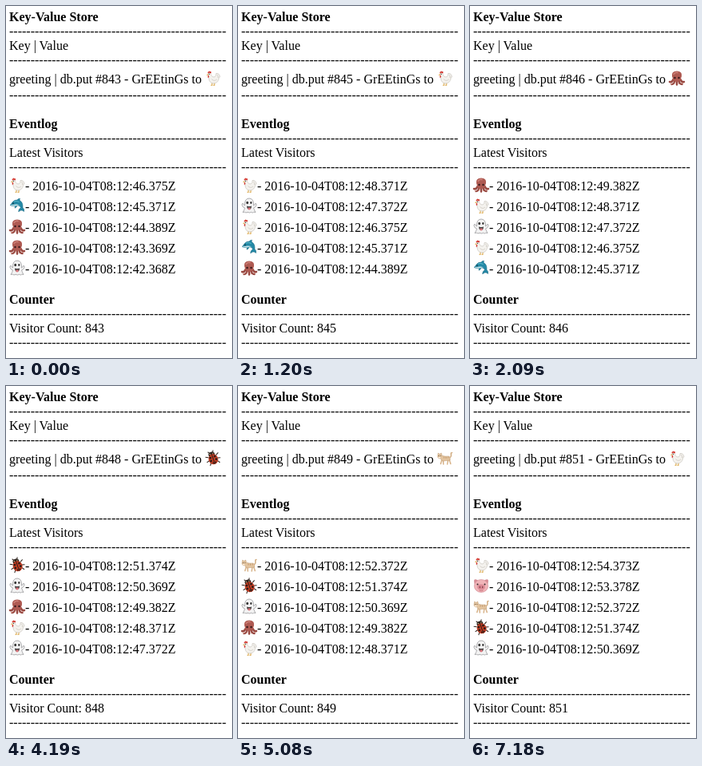
Recreate the animation shown at these times as an HTML page. Size 283 px wide and 441 px high, loop 8000 ms.

```html
<!DOCTYPE html>
<html lang="en">
<head>
<meta charset="utf-8">
<title>Visitor log</title>
<style>
  html, body { margin: 0; width: 100%; height: 100%; overflow: hidden; background: #fff; }
  svg { display: block; }
  text { font: 16px "Liberation Serif", Times, serif; }
  .title { font-weight: bold; }
</style>
</head>
<body>
<svg id="stage" width="283" height="441" viewBox="0 0 283 441"></svg>
<script>
// Small animals, each drawn in a 20 by 20 box.
const icons = {
  rooster: `
    <path d="M9 16v3M12 16v3M7.5 19.3h2M10.5 19.3h2" stroke="#d9a23c" fill="none"/>
    <path d="M4.5 4.5Q7 3 8 6.500Q9 9.500 12 9Q14.500 8 14 4.500Q18.500 4 19 9Q17.500 8.500 17.500 11Q16.500 16.500 11 17Q5.500 16.500 5 11Q5 8 4 6.500Z" fill="#f4f2ee" stroke="#c9c5bd" stroke-width=".7"/>
    <path d="M8.500 11.500q3 3.500 6.500.5M15.500 6q1.500 1.500 1 4" fill="none" stroke="#cfcac2" stroke-width=".8"/>
    <path d="M3.800 4.500Q3 2 4.500 2.500Q5.500 .5 6.500 2.200Q8.500 1.500 8 4.500L6 3.800Z" fill="#d33a32"/>
    <path d="M4 7q-1.200 2.500.3 3.200Q5.500 9.500 5.200 7Z" fill="#d33a32"/>
    <path d="M4.200 5L1.800 6.500L4.200 7Z" fill="#e3a73c"/>
    <circle cx="5.500" cy="5.300" r=".6" fill="#222"/>`,
  dolphin: `
    <path d="M1 9.500Q2.500 8.500 3.500 6.500Q6 2.500 10 3Q11 1 13.500 1.200Q12.800 2.500 13.300 3.800Q17.500 6 17 12.500Q19 14 18.500 17.500Q16.500 15.500 15 16Q13 16 11.800 18Q11.300 14.500 14.500 12.800Q13.500 9.800 10 9.800Q9.500 12.500 7 13.200Q7.300 11.500 7 10.500Q3.500 11 1 9.500Z" fill="#2489a6" stroke="#17627d" stroke-width=".5"/>
    <path d="M1.300 9.600Q5 8.800 8 8.500Q11 8.200 13 9.800Q11 9.300 9.500 9.900Q5 11.200 1.300 9.600Z" fill="#c7e3e8"/>
    <path d="M6 5Q9 3.500 12.500 5.500" fill="none" stroke="#5fbccd"/>
    <circle cx="5" cy="7.300" r=".7" fill="#111"/>`,
  octopus: `
    <path d="M5.500 12Q4 16 1 15M7.500 13Q7 18 3.500 18M10 13v5.500M12.500 13Q13 18 16.500 18M14.500 12Q16 16 19 15" fill="none" stroke="#984942" stroke-width="2.500" stroke-linecap="round"/>
    <path d="M4.500 12.500Q5.500 11 4 8Q3 1.500 10 1.500Q17 1.500 16 8Q14.500 11 15.500 12.500Q13 15 10 15Q7 15 4.500 12.500Z" fill="#ae5a52"/>
    <path d="M6 5.500Q8 2.500 11 3.500" fill="none" stroke="#cd8178" stroke-width="1.500" stroke-linecap="round"/>
    <path d="M2 17.500h2M7 17.500l1-2M12 17l1 1M16 16.500h2" stroke="#d79a8c"/>
    <circle cx="7.500" cy="10" r="1.200" fill="#35191b"/><circle cx="12.500" cy="10" r="1.200" fill="#35191b"/>`,
  ghost: `
    <path d="M4.500 10Q4 1 10 1Q16 1 15.500 10Q17 9.500 17.500 7.500Q19.500 7 19 9.500Q18 12.500 15.500 13Q16.500 16 18 18.500Q15.500 17.500 14.500 19Q12.500 17.500 10.500 19Q8 17.500 6 19Q4.500 17.500 2 18.500Q4 15.500 4.500 13Q2 12.500 1 9.500Q.5 7 2.500 7.500Q3 9.500 4.500 10Z" fill="#f3f3f3" stroke="#a5a5a8" stroke-width=".9"/>
    <ellipse cx="7.700" cy="6.500" rx="1.400" ry="1.800" fill="#333"/>
    <ellipse cx="12.300" cy="6.500" rx="1.100" ry="1.400" fill="#333"/>
    <path d="M7 10.500Q10 11.500 13 10.500Q13 14.500 10 15Q7 14.500 7 10.500Z" fill="#444"/>
    <path d="M8.500 12.500h3v2Q10 16.500 8.500 14.500Z" fill="#e0757c"/>`,
  ladybug: `
    <g transform="rotate(-20 10 10)">
      <path d="M5 8L1.500 6M4.500 12L1 13M6 15L3.500 18.500M15 8l3.500-2M15.500 12L19 13M14 15l2.500 3.500M8.500 4L6.500 1M11.500 4l2-3" stroke="#30251f" fill="none"/>
      <ellipse cx="10" cy="5.500" rx="4" ry="3.300" fill="#2a211d"/>
      <ellipse cx="10" cy="11.800" rx="6" ry="6.500" fill="#c23c22"/>
      <path d="M10 6v12.300" stroke="#33201a"/>
      <g fill="#2b1c18">
        <circle cx="7" cy="9" r="1.400"/><circle cx="13" cy="9" r="1.400"/>
        <circle cx="6.500" cy="13" r="1.400"/><circle cx="13.500" cy="13" r="1.400"/>
        <circle cx="8.500" cy="16.300" r="1"/><circle cx="11.500" cy="16.300" r="1"/>
      </g>
      <path d="M7.500 4.500h1.200M11.300 4.500h1.200" stroke="#ead9a6"/>
    </g>`,
  cat: `
    <path d="M15.500 10Q18.500 9 17.800 5.500Q17.500 3.500 19 3.500" fill="none" stroke="#d3ae83" stroke-width="1.500" stroke-linecap="round"/>
    <path d="M6.500 12L4.800 17.500M8 12.500l.3 5.500M14 12.500l-.8 5.500M15.500 12l1.800 5.500" stroke="#d9b68e" stroke-width="1.600" stroke-linecap="round"/>
    <path d="M1 7.500L1.700 4L3.500 5.300L5.700 4L6.500 7.300Q11 8.500 15 8Q17.500 9.500 16.500 13Q12 13.500 8 14Q5.500 13.500 5 11Q2 11.500 1 9Z" fill="#e3c49f" stroke="#bd9870" stroke-width=".5"/>
    <path d="M9 8.500v2M11.500 8.500v2.200M14 8.500v2" stroke="#b98d60" stroke-width=".8"/>
    <path d="M1.500 9.300Q3 8.500 4.800 9.500L3.500 10.700Z" fill="#fff6e8"/>
    <path d="M2.300 7.500h.7M4.500 7.500h.7" stroke="#443526" stroke-width="1.100"/>`,
  pig: `
    <path d="M2 8Q.5 2.500 2.500 2.500Q5.500 2.500 7 5ZM18 8Q19.500 2.500 17.500 2.500Q14.500 2.500 13 5Z" fill="#d98d95" stroke="#c77983" stroke-width=".5"/>
    <ellipse cx="10" cy="10.500" rx="8.700" ry="8" fill="#f0b4b8" stroke="#d38e96" stroke-width=".6"/>
    <ellipse cx="10" cy="12" rx="4.300" ry="3.100" fill="#df8d98" stroke="#c9737f" stroke-width=".5"/>
    <ellipse cx="8.400" cy="12" rx=".8" ry="1.300" fill="#85444d"/>
    <ellipse cx="11.600" cy="12" rx=".8" ry="1.300" fill="#85444d"/>
    <circle cx="5.500" cy="8.500" r="1" fill="#33262a"/><circle cx="14.500" cy="8.500" r="1" fill="#33262a"/>
    <path d="M7.500 16.300q2.500 1 5 0" stroke="#c36b77" fill="none" stroke-width=".8"/>`
};

const visits = [
  ["ghost", "42.368"], ["octopus", "43.369"], ["octopus", "44.389"], ["dolphin", "45.371"],
  ["rooster", "46.375"], ["ghost", "47.372"], ["rooster", "48.371"], ["octopus", "49.382"],
  ["ghost", "50.369"], ["ladybug", "51.374"], ["cat", "52.372"], ["pig", "53.378"], ["rooster", "54.373"]
];
const updates = [150, 1200, 2090, 3140, 4190, 5080, 6130, 7180];
const duration = 8000;

const text = (y, value, x = 4, type = "") => `<text class="${type}" x="${x}" y="${y}">${value}</text>`;
const title = (y, value) => text(y, value, 4, "title");
const rule = y => text(y, "-".repeat(51));
const icon = (name, x, baseline) => `<g transform="translate(${x} ${baseline - 17})">${icons[name]}</g>`;

function render(step) {
  const count = 843 + step;
  const latest = visits.slice(step, step + 5).reverse();
  const rows = latest.map(([name, seconds], i) => {
    const y = 231 + 26 * i;
    return icon(name, 4, y) + text(y, `- 2016-10-04T08:12:${seconds}Z`, 24);
  });
  document.getElementById("stage").innerHTML = [
    title(19, "Key-Value Store"), rule(37), text(55, "Key | Value"), rule(73),
    text(97, `greeting | db.put #${count} - GrEEtinGs to`), icon(latest[0][0], 249, 97), rule(117),
    title(153, "Eventlog"), rule(171), text(189, "Latest Visitors"), rule(207), ...rows,
    title(373, "Counter"), rule(391), text(409, `Visitor Count: ${count}`), rule(427)
  ].join("");
}

let shown = -1;
const start = performance.now();
function tick() {
  const time = (performance.now() - start) % duration;
  const step = updates.filter(at => at <= time).length;
  if (step !== shown) render(shown = step);
  requestAnimationFrame(tick);
}
tick();
</script>
</body>
</html>
```
